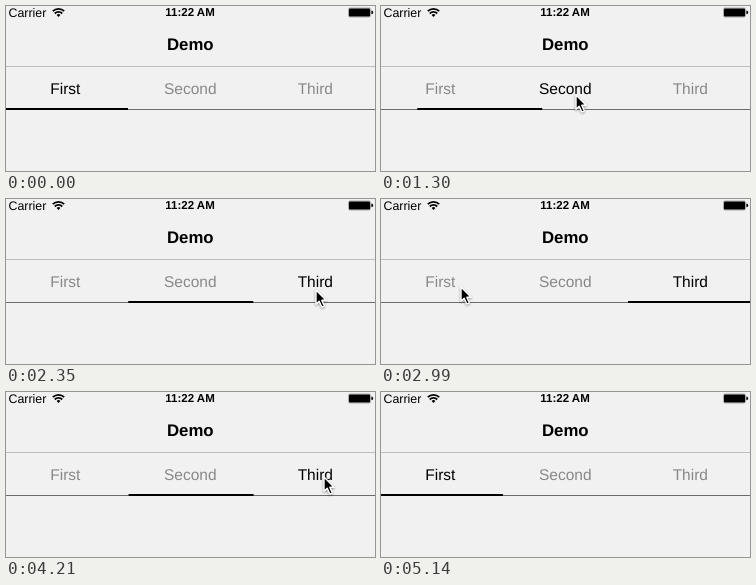
An HTML page that plays this animation: 369 by 165 pixels, repeating every 5.91 s.

```html
<!DOCTYPE html>
<html lang="en">
<head>
<meta charset="utf-8">
<title>Tab bar demo</title>
<style>
  html, body { margin: 0; width: 100%; height: 100%; overflow: hidden; background: #f1f1f1; }
  svg { display: block; width: 369px; height: 165px; }
  text { font-family: "Liberation Sans", Arial, sans-serif; text-rendering: geometricPrecision; }
  .tab { font-size: 15.5px; text-anchor: middle; }
  .bold { font-weight: bold; text-anchor: middle; }
  #cursor { filter: drop-shadow(0 1px 1px rgba(0, 0, 0, .4)); }
</style>
</head>
<body>
<svg viewBox="0 0 369 165">
  <text x="2.5" y="10.5" font-size="12.4">Carrier</text>
  <g fill="none" stroke="#000" stroke-width="1.8">
    <path d="M46.8 5.2a8 8 0 0 1 11.4 0M48.8 7.5a5.2 5.2 0 0 1 7.4 0"/>
    <path d="M50.6 8.9a2.7 2.7 0 0 1 3.8 0L52.5 10.9z" fill="#000" stroke="none"/>
  </g>
  <text class="bold" x="184" y="10.2" font-size="11.5">11:22 AM</text>
  <rect x="342.5" y="2" width="22" height="9" rx="1.4" fill="none" stroke="#999" stroke-width=".8"/>
  <rect x="343" y="2.5" width="21" height="8" rx=".8"/>
  <path d="M365.4 4.6q1.8.2 1.8 1.8t-1.8 1.8z"/>

  <text class="bold" x="184.3" y="44" font-size="16.8">Demo</text>
  <rect y="60" width="369" height="1" fill="#bdbdbd"/>

  <text class="tab" x="59.3" y="87.7">First</text>
  <text class="tab" x="184.3" y="87.7">Second</text>
  <text class="tab" x="309.3" y="87.7">Third</text>
  <rect y="103" width="369" height="1" fill="#6c6c6c"/>
  <rect id="bar" y="102" width="125" height="2"/>

  <path id="cursor" d="M0 0V14.2L3.2 11.2L5.8 17L8.3 15.9L5.8 10.3H10.2Z"
        stroke="#fff" stroke-width="1.4" stroke-linejoin="round"/>
</svg>
<script>
const LOOP = 5910, SLIDE = 150, PAUSE = 100, TRAVEL = 450;
const TAB_WIDTH = 125, FIRST_X = -3;

// The pointer enters from below, taps the tabs in turn and leaves again
const visits = [
  { at: 500, x: 158, y: 168, tab: 0 },
  { at: 1245, x: 195, y: 89, tab: 1 },
  { at: 2347, x: 310, y: 91, tab: 2 },
  { at: 3080, x: 80, y: 88, tab: 0 },
  { at: 3687, x: 172, y: 83, tab: 1 },
  { at: 4205, x: 318, y: 85, tab: 2 },
  { at: 4835, x: 68, y: 88, tab: 0 },
  { at: 5140, x: 200, y: 170, tab: 0 }
];

const tabs = document.querySelectorAll('.tab');
const bar = document.getElementById('bar');
const cursor = document.getElementById('cursor');

const mix = (a, b, p) => a + (b - a) * p;
const ease = p => {
  p = Math.min(1, Math.max(0, p));
  return p * p * (3 - 2 * p);
};

function draw(t) {
  const i = Math.max(0, visits.findLastIndex(visit => t >= visit.at));
  const last = visits[i];
  const previous = visits[i - 1] ?? last;
  const next = visits[i + 1] ?? last;

  const position = mix(previous.tab, last.tab, ease((t - last.at) / SLIDE));
  bar.setAttribute('x', FIRST_X + TAB_WIDTH * position);
  tabs.forEach((tab, n) => tab.setAttribute('fill', n === last.tab ? '#000' : '#888'));

  // Rest after a tap, then reach the next spot no later than its tap
  const leave = last.at + PAUSE;
  const p = ease((t - leave) / Math.min(TRAVEL, Math.max(1, next.at - leave)));
  cursor.setAttribute('transform',
    `translate(${mix(last.x, next.x, p)} ${mix(last.y, next.y, p)})`);
}

const startTime = performance.now();
function frame() {
  draw((performance.now() - startTime) % LOOP);
  requestAnimationFrame(frame);
}
frame();
</script>
</body>
</html>
```
